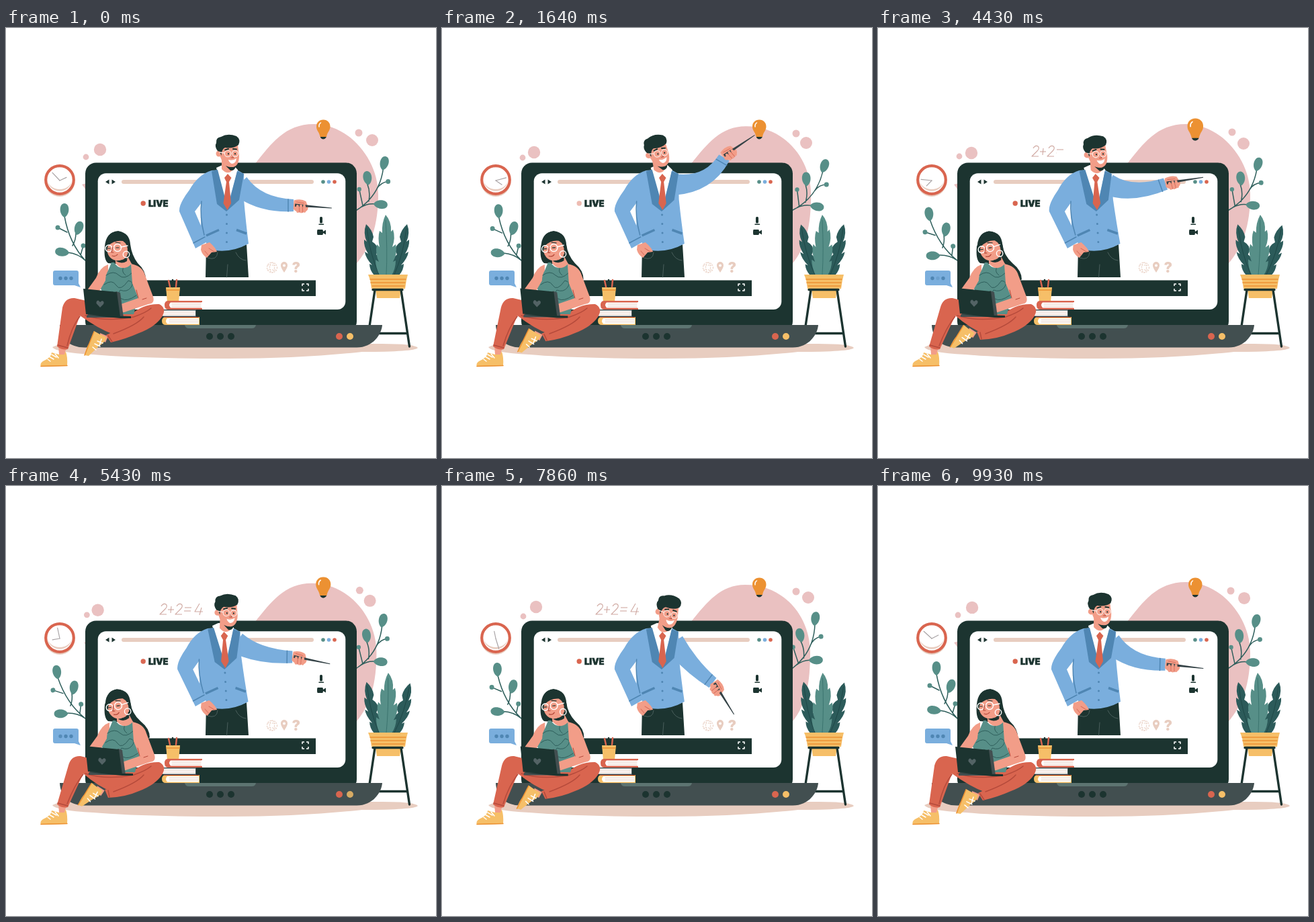
Recreate the animation shown at these times as an HTML page. Size 640x640 px, loop 10 s.

```html
<!DOCTYPE html>
<html lang="en">
<head>
<meta charset="utf-8">
<title>Online lesson</title>
<style>
  html, body { margin: 0; height: 100%; overflow: hidden; background: #fff; }
  svg { display: block; width: 100vw; height: 100vh; }
  .dark { fill: #1c3430 } .slate { fill: #424f50 } .pink { fill: #eac1c1 } .peach { fill: #e8cdc0 }
  .red { fill: #d9654f } .yellow { fill: #f6bf68 } .orange { fill: #ec9132 } .white { fill: #fff }
  .blue { fill: #7aaedd } .steel { fill: #4f86b3 } .skin { fill: #f29d88 }
  .leaf { fill: #578f88 } .deep { fill: #2c5b5a }
  .line { fill: none; stroke-linecap: round; stroke-linejoin: round; stroke-width: 1.5 }
  .stem { stroke: #2f5f5c } .ink { stroke: #1c3430 } .seam { stroke: #4f86b3 }
  .crease { stroke: #b54a3b } .pale { stroke: #fff } .finger { stroke: #d9705f; stroke-width: 1 }
  .gold { stroke: #ec9132 } .sand { stroke: #e8cdc0 } .chalk { stroke: #cfa8a1; stroke-width: 1.1; stroke-linecap: butt }
  text { font-family: Inter, sans-serif; font-weight: 900 }
</style>
</head>
<body>
<svg viewBox="0 0 640 640">
  <defs>
    <path id="leaf" class="leaf" d="M0,0C-9,-5 -8,-21 0,-21S9,-5 0,0"/>
    <g id="sideLeaf">
      <path class="deep" d="M561,368H548Q541,360 541,351L545,353Q535,342 534,333L539,336Q532,325 533,315L537,318Q531,305 536,292Q545,300 547,311L545,318Q555,324 553,333L551,337Q560,344 557,353Q563,360 561,368Z"/>
      <path class="line" stroke="#1c4443" style="stroke-width:.8" d="M537,298Q541,335 555,367"/>
    </g>
  </defs>

  <path id="blob" class="pink"/>
  <path id="blobEdge" class="pink" d="M120,231L113,233Q116,236 118,240Z"/>
  <g id="bubbles" class="pink"></g>

  <g id="leftPlant">
    <path class="line stem" d="M118,346Q94,320 87,280M99,324Q104,316 104,305M77,297L91,304M115,324L111,338M92,334Q108,336 118,346"/>
    <use href="#leaf" x="87" y="282"/>
    <use href="#leaf" transform="translate(105,308) rotate(18)"/>
    <use href="#leaf" transform="translate(94,335) rotate(-82)"/>
    <circle class="leaf" cx="77" cy="297" r="3.5"/><circle class="leaf" cx="115" cy="324" r="3.5"/>
  </g>
  <g id="rightPlant">
    <path class="line stem" d="M522,271Q556,250 562,210M569,229Q558,230 552,240M538,232Q543,244 540,258M528,267Q538,261 548,262M526,240L531,264"/>
    <use href="#leaf" transform="translate(561,212) rotate(14)"/>
    <use href="#leaf" transform="translate(540,234) rotate(-8)"/>
    <use href="#leaf" transform="translate(547,262) rotate(95)"/>
    <circle class="leaf" cx="569" cy="229" r="3.5"/><circle class="leaf" cx="526" cy="240" r="3.2"/>
  </g>

  <path class="peach" d="M69,475Q82,468 120,470H560Q608,470 613,476Q608,482 530,482Q440,492 330,492Q200,492 130,486Q74,483 69,475Z"/>

  <use href="#sideLeaf" id="leafL"/>
  <use href="#sideLeaf" id="leafR"/>
  <g id="leafC">
    <path class="leaf" d="M556,368Q550,356 550,345L555,348Q549,335 552,322L556,326Q553,312 556,302L560,305Q559,290 565,278Q574,288 573,303L576,300Q580,312 575,326L580,322Q583,336 576,348L580,346Q580,358 574,368Z"/>
    <path class="line" stroke="#356e69" style="stroke-width:.8" d="M565,286Q568,330 566,367"/>
  </g>
  <path class="yellow" d="M539,367H598L596,375L594,388H544L542,375ZM550,390H588L586,402H552Z"/>
  <path class="line gold" d="M542,374H595M543,379H594M545,384H593"/>
  <path class="line ink" style="stroke-width:3.400" d="M546,389.500H590M549,390L541,444M588,390L600.500,474M556,454.500H597"/>

  <rect class="dark" x="118" y="200.500" width="404" height="252" rx="16"/>
  <rect class="white" x="136.700" y="216.300" width="368.600" height="202.700" rx="12"/>
  <path class="slate" d="M80,442H560C559,456 546,475.500 522,475.500H117C94,475.500 81,462 80,442Z"/>
  <path fill="#5d7471" d="M266,442H372Q371,447 366,447H272Q267,447 266,442Z"/>
  <g class="dark"><circle cx="303" cy="459" r="5"/><circle cx="319" cy="459" r="5"/><circle cx="335" cy="459" r="5"/></g>
  <circle class="red" cx="496" cy="459" r="5"/><circle id="lamp" class="yellow" cx="512" cy="459" r="5"/>

  <path class="dark" d="M153.500,225.500V232.500L148,229ZM157.500,225.500V232.500L163,229Z"/>
  <rect class="peach" x="172" y="226" width="286" height="6" rx="3"/>
  <circle class="leaf" cx="472" cy="229" r="2.800"/><circle class="blue" cx="480.500" cy="229" r="2.800"/><circle class="red" cx="489" cy="229" r="2.800"/>
  <circle id="liveDot" class="red" cx="204.200" cy="261" r="3.700"/>
  <text class="dark ink" x="212" y="266" font-size="13" stroke-width=".6">LIVE</text>
  <path class="dark" d="M182,375.500H461V399H182Z"/>
  <path class="line pale" style="stroke-linecap:butt" d="M441,384V381H444M447,381H450V384M450,388V391H447M444,391H441V388"/>
  <rect class="dark" x="467" y="281" width="4" height="9.500" rx="1.500"/><path class="line ink" d="M466,292.200H472.500"/>
  <path class="dark" d="M464,300H471Q472,300 472,303L476,300.500V307.500L472,305Q472,308 471,308H464Q463,308 463,304T464,300Z"/>
  <g class="line sand" style="stroke-width:1.100;stroke-dasharray:2 1.500;stroke-linecap:butt">
    <circle cx="396" cy="356.500" r="7.500"/><ellipse cx="396" cy="356.500" rx="3.500" ry="7.500"/>
    <path d="M389,353H403M389,360H403"/>
  </g>
  <path class="peach" fill-rule="evenodd" d="M414,364Q408.500,356 409,353A5,5 0 0 1 419,353Q419.500,356 414,364ZM412,353.500A2,2 0 0 0 416,353.500A2,2 0 0 0 412,353.500Z"/>
  <text class="peach" x="425.500" y="364" font-size="21">?</text>

  <circle class="peach" cx="80" cy="229" r="22"/>
  <circle cx="80" cy="226" r="20.800" fill="#fff" stroke="#d9654f" stroke-width="4.200"/>
  <path class="peach" d="M61.500,226A18.600,18.600 0 0 0 98.500,226A18.600,15.500 0 0 1 61.500,226Z"/>
  <path id="longHand" class="line" stroke="#a9a4a6" style="stroke-width:1.200" d="M80,227V211"/>
  <path id="shortHand" class="line" stroke="#a9a4a6" style="stroke-width:1.200" d="M80,227V216"/>

  <path class="blue" d="M73,361H105Q108,361 108,364V380L111,386L102,383H73Q70,383 70,380V364Q70,361 73,361Z"/>
  <g id="typing" class="steel"><circle cx="81" cy="372.500" r="2.700"/><circle cx="89" cy="372.500" r="2.700"/><circle cx="97" cy="372.500" r="2.700"/></g>

  <g id="sum"></g>
  <path id="rays" class="line gold" style="stroke-width:2" d="M473,128V132.500M463,131L465.500,135M482.500,131L480,135"/>
  <g id="bulb">
    <path class="dark" d="M468,160H476.500V163Q472,168 468,163Z"/>
    <path class="orange" d="M472.300,136.500C478.500,136.500 482.500,141 482.500,146.500C482.500,153 478.500,154 477,162H467.500C466,154 462,153 462,146.500C462,141 466,136.500 472.300,136.500Z"/>
    <path class="line pale" d="M466,147Q465.500,143 468.500,141"/>
  </g>

  <path class="dark" d="M298,325Q330,336 358,322L361,371H297Z"/>
  <path class="line" stroke="#566a67" style="stroke-width:.8" d="M330,352L328.500,371M342,334Q347,345 357,346M300,342Q314,347 315,334"/>
  <path id="sleeve" class="blue"/>
  <path id="cuff" class="line seam"/>
  <g id="torso">
    <path class="blue" fill-rule="evenodd" d="M306,212Q286,218 273,241Q257,262 258,273L282,328L298,319V328Q330,338 361,321Q357,290 354,255V217L340,209ZM291,260L281,273L290,294Z"/>
    <path class="white" d="M313,208L322,204H338L345,211L329,268Z"/>
    <path class="steel" d="M315,211L306,213L314,262L328,273L347,256L354,217L344,213L330,268Z"/>
    <path class="line seam" d="M291,258Q288,280 295,308M279,320L296,311"/>
    <path class="red" d="M330,217L335.500,223L332,229L335,261L329.500,271L323.500,261L328,229L325,223Z"/>
    <path class="line seam" style="stroke-width:3.500;stroke-linecap:butt" d="M298,309L317,300.500M343,300.500L358,306"/>
    <path class="line seam" style="stroke-width:3;stroke-dasharray:0 13.500" d="M328.500,278V324"/>
    <path class="skin" d="M291,323L303,319Q312,327 314,333L306,334L299,342Q292,338 290,330Z"/>
    <path class="line finger" d="M302,328L310,333M296,332L301,338"/>
  </g>
  <g id="head">
    <path class="skin" d="M321,193L338,198V211Q330,220 321,210Z"/>
    <path class="dark" d="M327,205Q335,209 342,205Q341,213 334,212Z"/>
    <path class="skin" d="M319,180Q325,173 345,174L347,190Q347,205 338,207Q325,208 319,192Z"/>
    <circle class="skin" cx="317" cy="187" r="4.500"/>
    <path class="dark" d="M315,183Q310,176 313,171Q312,163 320,162Q330,156 343,161Q350,166 346,174Q338,180 326,178Q321,180 320.500,190L318,184Z"/>
    <path class="white" d="M331,196Q338,198 343,194Q342,202 336,202Q332,200 331,196Z"/>
    <path class="line ink" style="stroke-width:2" d="M326,181.500L331,180M338,180L343,180.500M331,187V187.500M341,187V187.500"/>
    <path class="line crease" style="stroke-width:1" d="M336,188L338.500,193H335"/>
    <g class="line" stroke="#fbe7e0" style="stroke-width:1.300"><circle cx="330" cy="187" r="4.700"/><circle cx="341" cy="187" r="4.500"/><path d="M318,185L325,186"/></g>
  </g>
  <g id="hand">
    <path class="skin" d="M-10,-7Q0,-11 8,-7L12,2Q12,8 6,9Q-3,12 -10,6Z"/>
    <path d="M-8,-2.200L47,-.4V.6L-8,2Z" fill="#344246"/>
    <path class="line" stroke="#f29d88" style="stroke-width:4" d="M-4,1L-3,9M1,0L2,9M6,0L7,8"/>
    <path class="line finger" d="M-1.500,2L-.5,10M3.500,2L4.500,10M-6,-5L5,-4"/>
  </g>

  <path class="yellow" d="M238,386H259L257,408H240Z"/><path class="line gold" d="M239,390H258"/>
  <path class="line" stroke="#d9654f" style="stroke-width:2.500" d="M242,376L244,385M254,375L253,385"/>
  <path class="line ink" style="stroke-width:2.500" d="M248,375V385"/>
  <path class="red" d="M292,406H241Q236,406 236,412.500T241,419H292V417H291V408H292Z"/>
  <path class="white" d="M291,408.500H245Q241,412 245,416.500H291Z"/>
  <path class="slate" d="M283,419H237Q232,419 232,424.500T237,430H283Z"/>
  <path class="white" d="M282,420.500H231V428.500H282Z"/>
  <path class="yellow" d="M288,430H238Q232,430 232,436T238,442H288Z"/>
  <path class="white" d="M287,432H240Q236,436 240,440.500H287Z"/>
  <path class="line sand" style="stroke-width:1" d="M247,411H290M247,414H290M235,423H281M235,426H281M243,434.500H286M243,437.500H286"/>
  <path class="line crease" style="stroke-width:1" d="M236,430.500H287"/>

  <path id="hairBack" class="dark"/>
  <path class="yellow" d="M68,483L79,486L89,482Q92,490 91,503L52,504Q50,499 55,496Q67,491 68,483Z"/>
  <path class="line gold" d="M52,503.500L91,502.500"/><path class="line pale" d="M64,489L71,493M68,486L75,490M62,493L66,496M73,485L78,491"/>
  <path class="skin" d="M78,473L90,475L87,486H79Z"/>
  <g id="shoe">
    <path class="skin" d="M140,454L152,459L148,468L140,463Z"/>
    <path class="yellow" d="M131,451L140,456L149,460Q148,468 139,473Q127,484 123,488L117,487Q119,476 124,469Z"/>
    <path class="line gold" d="M131,452L117,487"/><path class="line pale" d="M136,466L144,469M132,470L140,474M129,475L134,479M142,463L139,473"/>
  </g>
  <path id="thigh" class="red"/>
  <path id="shin" class="red"/>
  <path id="creases" class="line crease"/>
  <g id="girl">
    <path class="skin" d="M152,352Q140,356 134,372L121,390L136,394L152,376Z"/>
    <path class="leaf" d="M157,349L152,361Q148,368 148,376L141,388L160,426H190L197,400L192,368L187,350Q170,364 161,349Z"/>
    <path class="line stem" style="stroke-width:1" d="M149,368Q160,360 168,368T188,364M146,382Q158,373 164,383T182,376Q192,378 186,386T170,390Q164,398 172,403T194,398M158,392Q168,400 160,408M176,355Q170,362 178,368"/>
    <path class="skin" d="M163,338H180L187,351Q174,364 163,350ZM186,351Q203,354 207,368L219,400Q222,410 212,411L176,423Q168,424 167,417L171,411L197,402L188,380Z"/>
    <path class="line crease" style="stroke-width:1" d="M197,402L194,390M203,404L209,402"/>
    <g id="girlHead">
      <path class="dark" d="M164,344Q174,349 181,338L180,347Q172,352 164,347Z"/>
      <path class="skin" d="M150,322Q160,304 179,316Q184,328 181,337Q172,348 163,346Q151,343 150,328Z"/>
      <path class="dark" d="M147,326Q148,304 167,302Q187,305 185,337L181,334Q182,322 174,317Q162,315 152,324Q148,332 152,346Q146,342 147,326Z"/>
      <g class="line pale" style="stroke-width:1.400"><circle cx="153" cy="328" r="5"/><circle cx="166" cy="327" r="5.500"/><path d="M171,326L181,324"/><circle cx="179" cy="337" r="4.700"/></g>
      <path class="line ink" style="stroke-width:1.200" d="M151,328H155M164,327H168M150,321L155,320M163,319L170,320"/>
      <path class="line crease" style="stroke-width:1.200" d="M159,326L157,334H160M158,339Q163,341 166,337"/>
    </g>
  </g>
  <g id="notebook">
    <path class="slate" d="M164,392L170,394L175,431H120V428Z"/>
    <path class="dark" d="M115,388L165,393L170,430L119,426ZM120,427L186,429V432L170,432Z"/>
    <path fill="#536365" d="M140,416L134.500,410Q134,405.500 137.500,405.500L140,408L143,406Q147,407 145,411Z"/>
  </g>
</svg>
<script>
const LOOP = 10000, TAU = Math.PI * 2;
const times = [0, 1640, 3070, 4430, 6430, 7860];
const $ = id => document.getElementById(id);
const set = (id, name, value) => $(id).setAttribute(name, value);
const move = (id, value) => set(id, 'transform', value);
const clamp = x => Math.max(0, Math.min(1, x));

// Smooth looping curve through one value per entry of times
function pose(v, t) {
  const n = times.length;
  const at = j => v[(j + n) % n];
  const when = j => times[(j + n) % n] + LOOP * Math.floor(j / n);
  const slope = j => (at(j + 1) - at(j - 1)) / (when(j + 1) - when(j - 1));
  let i = n - 1;
  while (times[i] > t) i--;
  const h = when(i + 1) - when(i), u = (t - when(i)) / h, w = 1 - u;
  return at(i) * w * w * (1 + 2 * u) + at(i + 1) * u * u * (3 - 2 * u)
    + h * u * w * (w * slope(i) - u * slope(i + 1));
}

// Opacity that falls to low around centre once per period
const dip = (t, period, centre, half, low) =>
  low + (1 - low) * clamp(Math.abs(t % period - centre) / half);

const bubbles = [
  { r: 9.2, x: [140, 137, 139, 139, 135, 140], y: [181, 185, 185, 186, 183, 180] },
  { r: 4.4, x: [119, 120, 122, 121, 120, 121], y: [192, 193, 193, 191, 193, 194] },
  { r: 9, x: [545, 542, 544, 544, 540, 545], y: [167, 171, 171, 172, 169, 166] },
  { r: 5.5, x: [525, 527, 528, 527, 526, 527], y: [156, 157, 156, 155, 156, 157] }
];
const arm = {
  bendX: [375, 396, 390, 378, 372, 370], bendY: [264, 234, 228, 250, 256, 268],
  wristX: [428, 420, 414, 428, 420, 403], wristY: [264, 193, 187, 232, 273, 293],
  tipX: [484, 472, 458, 484, 464, 436], tipY: [268, 155, 146, 222, 300, 342]
};
const two = x => `M${x},179q3,-5 7,-3q3,3 -1,7l-8,8h10`;
const strokes = [two(231), 'M241,184H250', 'M246,179L245,189', two(254),
  'M266,181H276', 'M265,186H275', 'M288,175L281,187H293', 'M291,181L288,192'];

$('bubbles').innerHTML = bubbles.map(b => `<circle r="${b.r}"/>`).join('');
$('sum').innerHTML = strokes.map(d => `<path class="line chalk" pathLength="1" d="${d}"/>`).join('');

function drawArm(t, lean) {
  const p = {};
  for (const key in arm) p[key] = pose(arm[key], t);
  const { bendX: bx, bendY: by, wristX: wx, wristY: wy } = p;
  const sx = 347 + lean * .7, sy = 232;
  const unit = (x, y) => [x / Math.hypot(x, y), y / Math.hypot(x, y)];
  const a = unit(bx - sx, by - sy), b = unit(wx - bx, wy - by), m = unit(a[0] + b[0], a[1] + b[1]);
  const off = (x, y, d, r) => `${x - d[1] * r},${y + d[0] * r}`;
  set('sleeve', 'd', `M${off(sx, sy, a, -15)}Q${off(bx, by, m, -12)} ${off(wx, wy, b, -9)}`
    + `L${off(wx, wy, b, 9)}Q${off(bx, by, m, 13)} ${off(sx, sy, a, 17)}Z`);
  const cx = wx - b[0] * 8, cy = wy - b[1] * 8;
  set('cuff', 'd', `M${off(cx, cy, b, -9)}L${off(cx, cy, b, 9)}`);
  const d = unit(p.tipX - wx, p.tipY - wy);
  const hx = wx + (b[0] + d[0]) * 5, hy = wy + (b[1] + d[1]) * 5;
  move('hand', `translate(${hx},${hy}) rotate(${Math.atan2(p.tipY - hy, p.tipX - hx) * 360 / TAU})`);
}

function drawMan(t) {
  const lean = pose([0, -2, -4, -6, -4, -2], t);
  move('torso', `matrix(1,0,${-lean / 108},1,${lean * 330 / 108},0)`);
  const x = pose([0, -6, -7, -4.5, -1.5, 0], t), y = pose([0, 0, 0, 1, 2.5, 2.5], t);
  move('head', `translate(${x},${y}) rotate(${pose([0, -10, -10, -4, 8, 13], t)},330,208)`);
  drawArm(t, lean);
}

function drawGirl(w) {
  const k = 9 * w, h = 6 * w, inner = 110 + 5 * w;
  set('hairBack', 'd', `M150,318Q152,302 168,303Q184,305 185,322Q187,338 ${196 + h * .7},350`
    + `Q${208 + h},361 ${208 + h},374Q${206 + h},379 198,372L176,352L152,350Q145,345 147,325Z`);
  set('thigh', 'd', `M76,474L${84 + k},416Q${88 + k},401 ${102 + k},402L190,422L205,440L160,456Q138,448 ${inner},428L92,478Q84,480 76,474Z`);
  set('shin', 'd', `M185,427Q205,410 228,411Q240,417 232,430Q222,445 198,454Q178,463 ${156 - 4 * w},${468 - 4 * w}L${149 - 2 * w},${457 - 5 * w}Q178,444 196,431Z`);
  set('creases', 'd', `M${inner},429Q${97 + k * .5},446 91,473M77,472L92,476M118,428Q150,438 190,430Q208,424 216,417M152,${458 - 5 * w}L${158 - 4 * w},${467 - 4 * w}M160,455Q195,442 205,430`);
  move('shoe', `translate(${-5 * w},${-8 * w}) rotate(${10 * w},140,458)`);
  move('girl', `translate(${2 * w},0)`);
  move('girlHead', `rotate(${-7 * w},167,335)`);
  move('notebook', `translate(${3 * w},${-w})`);
}

function drawScenery(t) {
  const phase = TAU * t / LOOP, sin = Math.sin(phase), rise = (1 - Math.cos(phase)) / 2;
  const k = pose([1, .2, 0, 1, 0, 0], t), top = 147 - 4 * k, right = 548 + 6 * k;
  set('blob', 'd', `M370,203C395,172 415,${top} ${451 + 7 * k},${top}`
    + `C510,${top} ${right},195 ${right},248C${right},300 540,330 518,355H370Z`);
  move('blobEdge', `translate(${7 * (1 - k)},0)`);
  bubbles.forEach((b, i) => {
    const c = $('bubbles').children[i];
    c.setAttribute('cx', pose(b.x, t));
    c.setAttribute('cy', pose(b.y, t));
  });
  move('leftPlant', `rotate(${-9 * rise},118,346)`);
  move('rightPlant', `rotate(${6 * sin - .5},522,271)`);
  move('leafL', `rotate(${-1.6 * sin},557,367)`);
  move('leafR', `rotate(${3.6 * rise},575,367) translate(1133,0) scale(-1,1)`);
  move('leafC', `rotate(${2.6 * rise},566,367)`);
  move('longHand', `rotate(${317 + 720 * t / LOOP},80,227)`);
  move('shortHand', `rotate(${65 + 360 * t / LOOP},80,227)`);
  drawGirl(Math.pow(rise, .6));
}

function drawSignals(t) {
  set('liveDot', 'opacity', dip(t, LOOP / 3, 1667, 450, .4));
  set('lamp', 'opacity', dip(t, 2500, 620, 250, .3));
  [650, 1980, 1330].forEach((centre, i) =>
    $('typing').children[i].setAttribute('opacity', dip(t, 2500, centre, 280, .2)));
  const size = pose([1, 1, 1.1, 1.15, 1, 1], t);
  move('bulb', `translate(472,150) scale(${size}) translate(-472,-150)`);
  set('rays', 'opacity', clamp(3 * Math.sin(Math.PI * clamp((t - 2250) / 2050))));
  set('sum', 'opacity', clamp((9300 - t) / 400));
  strokes.forEach((_, i) => {
    const done = clamp((t - 3040) / 276 - i), path = $('sum').children[i];
    path.setAttribute('visibility', done ? 'visible' : 'hidden');
    path.setAttribute('stroke-dasharray', `${done} 2`);
  });
}

function frame() {
  const t = performance.now() % LOOP;
  drawScenery(t);
  drawMan(t);
  drawSignals(t);
  requestAnimationFrame(frame);
}
frame();
</script>
</body>
</html>
```
